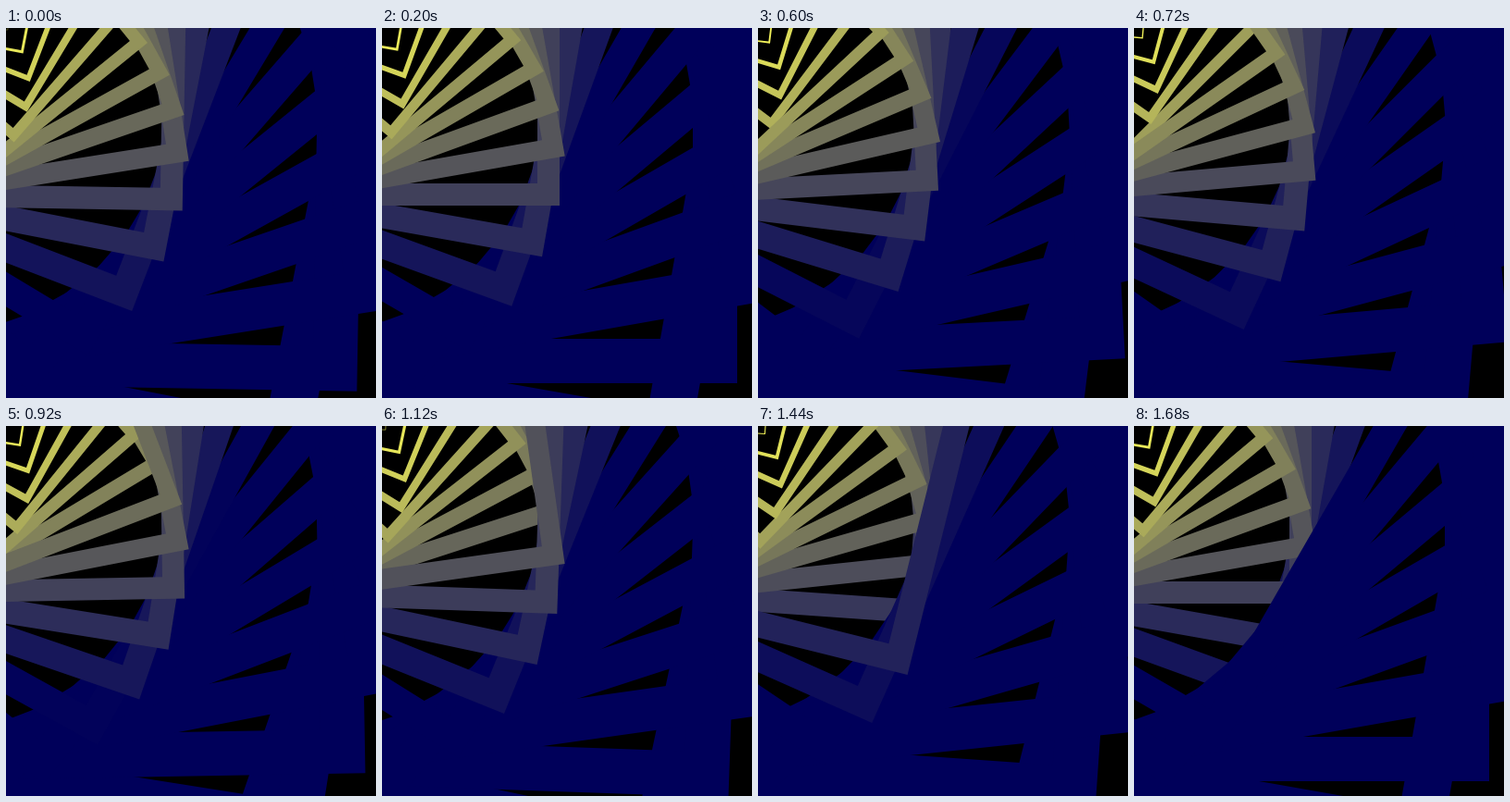
An HTML page with a canvas that plays this animation: 400x400 px, repeating every 1.72 s.

```html
<!DOCTYPE html>
<html>
<head>
<meta charset="utf-8">
<title>Square spiral</title>
<style>
  html, body { margin: 0; width: 100%; height: 100%; overflow: hidden; background: #000; }
  canvas { display: block; }
</style>
</head>
<body>
<canvas id="stage" width="400" height="400"></canvas>
<script>
const ctx = document.getElementById('stage').getContext('2d');
const LOOP = 1720, STEP = 40, COUNT = 20;

// The squares grow in ticks of a tenth of the spacing; the first step holds, then jumps.
function growthAt(ms) {
  const step = Math.floor(ms / STEP);
  const ticks = step === 0 ? 1 : Math.round(20 + (step - 5) * 100 / 37);
  return ticks / 10;
}

// Size, line width, angle and colour all follow from the growth k.
function drawSquare(k) {
  const half = 20 * k;
  const light = Math.max(0, Math.round(255 * (1 - k / 12)));
  ctx.save();
  ctx.rotate(k * Math.PI / 18);
  ctx.lineWidth = k * 8 / 3;
  ctx.strokeStyle = `rgb(${light}, ${light}, 90)`;
  ctx.strokeRect(-half, -half, 2 * half, 2 * half);
  ctx.restore();
}

function draw(ms) {
  const growth = growthAt(ms);
  ctx.fillStyle = '#000';
  ctx.fillRect(0, 0, 400, 400);
  // Fixed stacking order: a square that starts over stays beneath the rest.
  for (let i = COUNT - 1; i >= 0; i--) {
    const k = (i + growth) % COUNT;
    if (k > 0.01) drawSquare(k);
  }
}

const start = performance.now();
function tick() {
  draw((performance.now() - start) % LOOP);
  requestAnimationFrame(tick);
}
tick();
</script>
</body>
</html>
```
